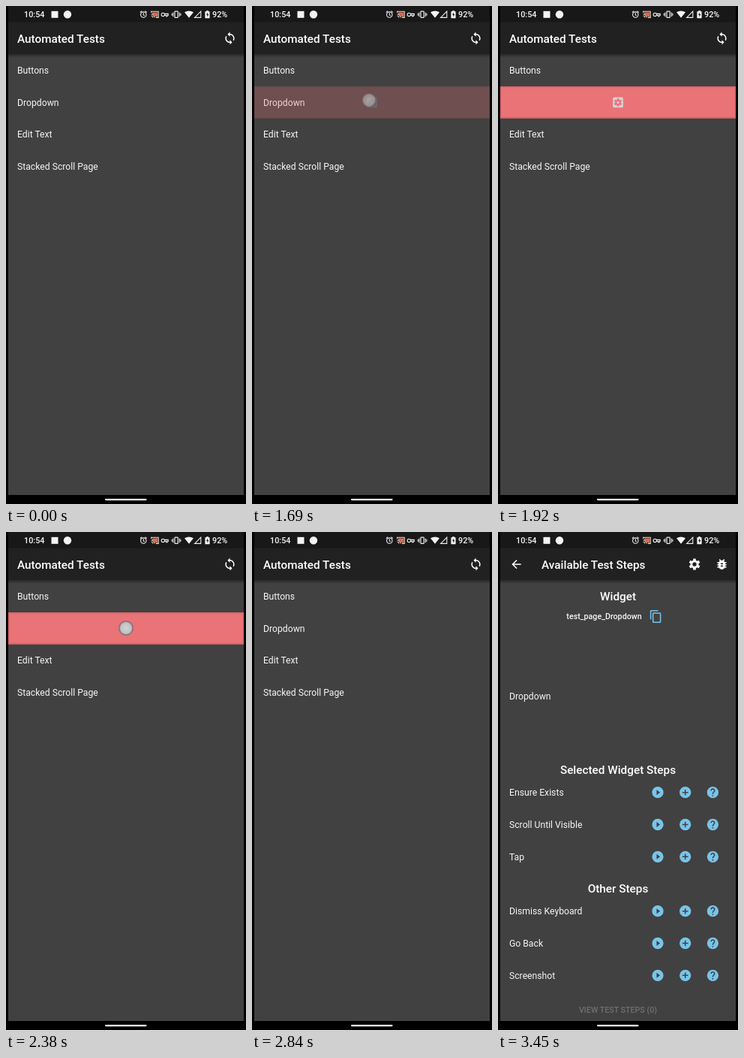
Recreate the animation shown at these times as an HTML page. Size 320 by 663 pixels, loop 3.51 s.

```html
<!DOCTYPE html>
<html lang="en">
<head>
<meta charset="utf-8">
<title>Automated tests</title>
<style>
  html, body { margin: 0; width: 100%; height: 100%; overflow: hidden; background: #000; }
  svg { display: block; width: 100%; height: 100%; }
  text { font: 400 12.2px Roboto, "Noto Sans", sans-serif; fill: #f6f6f6; }
  .title { font-size: 15.3px; font-weight: 500; fill: #fff; }
  .small { font-size: 10.7px; font-weight: 500; }
  .mid { text-anchor: middle; }
  .off { fill: #707070; }
  .clock { font-size: 10.8px; font-weight: 500; }
</style>
</head>
<body>
<svg id="stage" viewBox="0 0 320 663">
  <defs>
    <clipPath id="screen"><rect x="3" y="0" width="314" height="651"/></clipPath>
    <linearGradient id="shade" x2="0" y2="1">
      <stop offset="0" stop-color="#000" stop-opacity=".38"/>
      <stop offset="1" stop-color="#000" stop-opacity="0"/>
    </linearGradient>
    <radialGradient id="touch">
      <stop offset="0" stop-color="#d2d2d2"/>
      <stop offset=".62" stop-color="#c4c4c6"/>
      <stop offset=".76" stop-color="#aaa8b2"/>
      <stop offset=".86" stop-color="#6c6878" stop-opacity=".75"/>
      <stop offset="1" stop-color="#504c58" stop-opacity="0"/>
    </radialGradient>
  </defs>
  <rect width="320" height="663"/>
  <g clip-path="url(#screen)">
    <g id="home"></g>
    <g id="highlight"></g>
    <circle id="dot" r="10.5" fill="url(#touch)"/>
    <g id="steps"></g>
    <rect width="320" height="21.5" fill="#000" opacity=".28"/>
  </g>
  <g id="status"></g>
  <rect x="132" y="656" width="55.5" height="2.2" rx="1.1" fill="#fff"/>
</svg>
<script>
const LOOP = 3510, ICON = 0.764;
const BLUE = "#78c4ea";
const $ = id => document.getElementById(id);

const DISC = "M12 2a10 10 0 1 0 0 20a10 10 0 0 0 0-20z";
const ICONS = {
  sync: "M12 4V1L8 5l4 4V6c3.31 0 6 2.69 6 6 0 1.01-.25 1.97-.7 2.8l1.46 1.46C19.54 15.03 20 13.57 20 12c0-4.42-3.58-8-8-8zm0 14c-3.31 0-6-2.69-6-6 0-1.01.25-1.97.7-2.8L5.24 7.74C4.46 8.97 4 10.43 4 12c0 4.42 3.58 8 8 8v3l4-4-4-4v3z",
  back: "M20 11H7.83l5.59-5.59L12 4l-8 8 8 8 1.41-1.41L7.83 13H20z",
  bug: "M20 8h-2.8Q16.5 6.8 15.4 6L17 4.4 15.6 3l-2.2 2.2Q12 4.8 10.6 5.2L8.4 3 7 4.4 8.6 6Q7.5 6.8 6.8 8H4v2h2.1L6 12H4v2h2l.1 2H4v2h2.8a6 6 0 0 0 10.4 0H20v-2h-2.1l.1-2h2v-2h-2l-.1-2H20zM14 16h-4v-2h4zM14 12h-4v-2h4z",
  copy: "M16 1H4c-1.1 0-2 .9-2 2v14h2V3h12zM19 5H8c-1.1 0-2 .9-2 2v14c0 1.1.9 2 2 2h11c1.1 0 2-.9 2-2V7c0-1.1-.9-2-2-2zM19 21H8V7h11z",
  play: DISC + "M10 16.5v-9l6 4.5z",
  add: DISC + "M11 7h2v4h4v2h-4v4h-2v-4H7v-2h4z",
  help: DISC + "M13 19h-2v-2h2zM15.07 11.25l-.9.92C13.45 12.9 13 13.5 13 15h-2v-.5c0-1.1.45-2.1 1.17-2.83l1.24-1.26c.37-.36.59-.86.59-1.41 0-1.1-.9-2-2-2s-2 .9-2 2H8c0-2.21 1.79-4 4-4s4 1.79 4 4c0 .88-.36 1.68-.93 2.25z",
  gear: gear(10, 7.2, 3.5),
  gearBox: "M5 3h14a2 2 0 0 1 2 2v14a2 2 0 0 1-2 2H5a2 2 0 0 1-2-2V5a2 2 0 0 1 2-2z" + gear(7, 5.1, 2)
};

// Six-toothed wheel with a hub hole, centred in a 24-unit box
function gear(tip, body, hub) {
  const pts = [];
  for (let i = 0; i < 6; i++) {
    for (const [r, a] of [[body, -20], [tip, -13], [tip, 13], [body, 20]]) {
      const t = (i * 60 + a - 90) * Math.PI / 180;
      pts.push(`${(12 + r * Math.cos(t)).toFixed(2)} ${(12 + r * Math.sin(t)).toFixed(2)}`);
    }
  }
  return `M${pts.join("L")}zM12 ${12 - hub}a${hub} ${hub} 0 1 0 0 ${2 * hub}a${hub} ${hub} 0 1 0 0 ${-2 * hub}z`;
}

const icon = (name, x, y, fill = "#fff") =>
  `<path fill="${fill}" fill-rule="evenodd" transform="translate(${x} ${y}) scale(${ICON}) translate(-12 -12)" d="${ICONS[name]}"/>`;
const label = (s, x, y, cls = "") => `<text x="${x}" y="${y}" class="${cls}">${s}</text>`;
const page = inner =>
  `<rect x="3" width="314" height="651" fill="#414141"/>
   <rect x="3" y="64" width="314" height="5" fill="url(#shade)"/>
   <rect x="3" width="314" height="64" fill="#212121"/>${inner}`;

const stepRow = (name, y) => label(name, 15, y + 4.3) +
  ["play", "add", "help"].map((n, i) => icon(n, 213 + i * 36.7, y, BLUE)).join("");
const stepRows = (names, y) => names.map((n, i) => stepRow(n, y + i * 42.8)).join("");

$("home").innerHTML = page(
  label("Automated Tests", 15, 48.6, "title") + icon("sync", 298.5, 43) +
  ["Buttons", "Dropdown", "Edit Text", "Stacked Scroll Page"]
    .map((s, i) => label(s, 15, 89.8 + i * 42.75)).join(""));

$("highlight").innerHTML =
  `<rect x="3" y="107.2" width="314" height="42.2" fill="#ea7378"/>
   <rect x="4" y="108.2" width="312" height="40.2" fill="none" stroke="#e2686c" stroke-width="2"/>` +
  icon("gearBox", 160, 128.4, "#dccfcf");

$("steps").innerHTML = page(
  icon("back", 24.5, 43) + label("Available Test Steps", 58, 48.6, "title") +
  icon("gear", 262, 43) + icon("bug", 298.5, 43) +
  label("Widget", 160, 91, "title mid") +
  label("test_page_Dropdown", 141.5, 116.3, "small mid") + icon("copy", 210.5, 112.5, BLUE) +
  label("Dropdown", 15, 223.3) +
  label("Selected Widget Steps", 160, 322.3, "title mid") +
  stepRows(["Ensure Exists", "Scroll Until Visible", "Tap"], 346.7) +
  label("Other Steps", 160, 480.3, "title mid") +
  stepRows(["Dismiss Keyboard", "Go Back", "Screenshot"], 504.7) +
  label("VIEW TEST STEPS (0)", 160, 640, "small mid off"));

$("status").innerHTML =
  label("10:54", 24, 15.4, "clock") + label("92%", 275, 15.4, "clock") +
  `<g fill="#f4f4f4">
     <rect x="60.5" y="6.8" width="9" height="9"/>
     <circle cx="82" cy="11.3" r="5.2"/>
     <path d="M238 8.2Q244 4.6 250 8.2L244 15.8z"/>
     <path d="M267 6.2h3v1h1.6v9h-6.2v-9H267z"/>
     <rect x="225" y="7.2" width="4.2" height="8.2" rx=".6" fill="none" stroke="#eee" stroke-width="1.2"/>
   </g>
   <path d="M269 8.4l-2 3.4h1.3v2.8l2-3.5H269z" fill="#181818"/>
   <g fill="none" stroke="#eee" stroke-width="1.1">
     <circle cx="183.3" cy="11.6" r="3.7"/>
     <path d="M183.3 9.3v2.6l1.6 1M178.9 8.5l2.3-1.9M187.7 8.5l-2.3-1.9"/>
     <path d="M222.9 8.4v5.8M231.3 8.4v5.8M221.3 9.8v3M232.9 9.8v3"/>
     <path d="M259.8 7.2v8.2h-8.2z"/>
     <circle cx="209.3" cy="11.4" r="2.2"/>
     <path d="M211.5 10.4h4.7v2h-1v1.3h-1.6v-1.3h-2.1"/>
   </g>
   <path d="M195 8.6h7.2v5.6h-3.4q-.6-3-3.8-3.4z" fill="#e2684c"/>
   <path d="M193.6 9V7.2h9.6v8.2h-3.4M193.6 10.8q4 .4 4.4 4.6M193.6 13q2 .2 2.2 2.4" fill="none" stroke="#eedfda" stroke-width="1.1"/>`;

const clamp = v => Math.min(1, Math.max(0, v));
const ramp = (t, a, b) => clamp((t - a) / (b - a));

function bezier(x1, y1, x2, y2) {
  const at = (p, q, s) => 3 * p * s * (1 - s) ** 2 + 3 * q * s * s * (1 - s) + s ** 3;
  return x => {
    let lo = 0, hi = 1;
    for (let i = 0; i < 22; i++) {
      const s = (lo + hi) / 2;
      if (at(x1, x2, s) < x) lo = s; else hi = s;
    }
    return at(y1, y2, (lo + hi) / 2);
  };
}
const slideEase = bezier(.4, 0, .2, 1), fadeEase = bezier(.42, 0, 1, 1);

function draw(t) {
  $("highlight").setAttribute("opacity", ramp(t, 1610, 1900) - ramp(t, 2550, 2840));

  const second = t >= 2190;
  const start = second ? 2190 : 1380;
  const lift = ramp(t, start + 220, start + 420);
  $("dot").setAttribute("opacity", t < start ? 0 : 1 - lift);
  $("dot").setAttribute("cx", second ? 160 : 155.6 + lift);
  $("dot").setAttribute("cy", second ? 128 : 127.2 - 4 * lift);

  const p = ramp(t, 3130, 3440);
  $("steps").setAttribute("opacity", fadeEase(p));
  $("steps").setAttribute("transform", `translate(0 ${(166 * (1 - slideEase(p))).toFixed(2)})`);
  $("steps").style.display = p > 0 ? "" : "none";
}

const began = performance.now();
function tick() {
  draw((performance.now() - began) % LOOP);
  requestAnimationFrame(tick);
}
tick();
</script>
</body>
</html>
```
